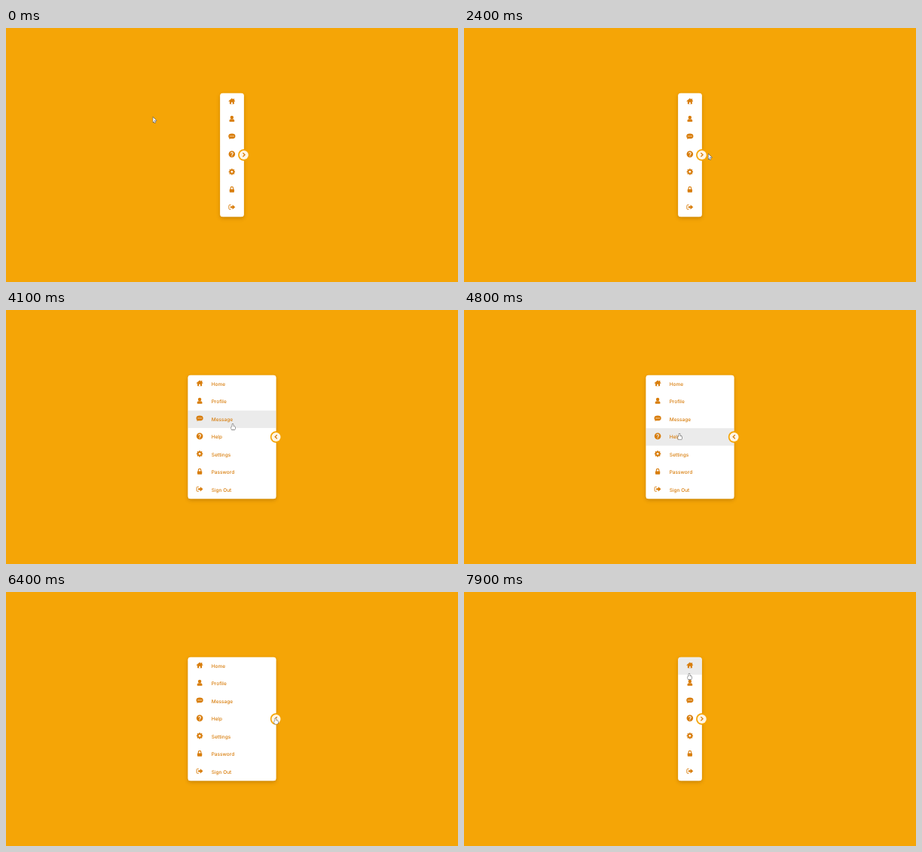
An HTML page with a canvas for the animation above (8000 ms loop, 600 px wide and 338 px high).

```html
<!DOCTYPE html>
<html lang="en">
<head>
<meta charset="utf-8">
<title>Side menu</title>
<style>
  html, body { margin: 0; width: 100%; height: 100%; overflow: hidden; background: #f5a506; }
  canvas { display: block; width: 600px; height: 338px; }
</style>
</head>
<body>
<canvas id="stage"></canvas>
<script>
const W = 600, H = 338, LOOP = 8000, STEP = 100, TAU = Math.PI * 2;
const BG = '#f5a506', INK = '#d87d0c', HOVER = '#ebebeb';
const MID = 300, MID_Y = 169, ROW = 23.5, TALL = ROW * 7, TOP = MID_Y - TALL / 2;
const NARROW = 31.5, WIDE = 117, OPEN_AT = 3044, CLOSE_AT = 6440, SLIDE = 600;
const SPIRAL_END = 2400, TOUR_START = 3500, TOUR_END = 5800;

const canvas = document.getElementById('stage');
const ctx = canvas.getContext('2d');
const dpr = window.devicePixelRatio || 1;
canvas.width = W * dpr;
canvas.height = H * dpr;

const mix = (a, b, u) => a + (b - a) * u;
const smooth = u => u * u * (3 - 2 * u);

// Same curve as the CSS "ease" keyword
function ease(x) {
  if (x <= 0) return 0;
  if (x >= 1) return 1;
  let lo = 0, hi = 1, s = 0.5;
  for (let i = 0; i < 24; i++) {
    s = (lo + hi) / 2;
    if (0.75 * s * (1 - s) + s ** 3 < x) lo = s; else hi = s;
  }
  return 0.3 * s * (1 - s) ** 2 + 3 * s * s * (1 - s) + s ** 3;
}

// Three shrinking turns that drift towards the toggle
function spiral(t) {
  const u = t / SPIRAL_END, a = u * 3 * TAU, r = 49 * (1 - u);
  return [mix(324.6, 195.3, (1 - u) ** 2) - r * Math.sin(a), 168 - r * Math.cos(a)];
}

// Sweeps up and down over the open menu
function tour(t) {
  return [
    301 + 15.5 * Math.cos((t - TOUR_START) / 2400 * TAU),
    168 - 71 * Math.sin((t - TOUR_START - 5) / 1285 * TAU)
  ];
}

// Stops: time, x, y
const stops = [
  [SPIRAL_END, ...spiral(SPIRAL_END)],
  [2700, 315, 167],
  [3050, 315, 167],
  [TOUR_START, ...tour(TOUR_START)],
  [TOUR_END, ...tour(TOUR_END)],
  [6250, 358, 168],
  [6450, 358, 168],
  [7000, 304, 211],
  [7200, 304, 211],
  [7500, 299, 239],
  [7940, 299, 105.5]
];

function glide(t) {
  const i = stops.findIndex(s => s[0] > t);
  if (i < 0) return stops[stops.length - 1].slice(1);
  const [t0, x0, y0] = stops[i - 1], [t1, x1, y1] = stops[i];
  const u = smooth((t - t0) / (t1 - t0));
  return [mix(x0, x1, u), mix(y0, y1, u)];
}

function pointer(t) {
  if (t < SPIRAL_END) return spiral(t);
  return t >= TOUR_START && t < TOUR_END ? tour(t) : glide(t);
}

function fill(color) {
  ctx.fillStyle = color;
  ctx.fill();
}

function line(width, color) {
  ctx.lineWidth = width;
  ctx.strokeStyle = color;
  ctx.stroke();
}

function disc(x, y, r, color) {
  ctx.beginPath();
  ctx.arc(x, y, r, 0, TAU);
  fill(color);
}

function box(x, y, w, h, r, color) {
  ctx.beginPath();
  ctx.roundRect(x, y, w, h, r);
  if (color) fill(color);
}

// Open triangle pointing along the angle
function wedge(x, y, span, depth, angle) {
  ctx.save();
  ctx.translate(x, y);
  ctx.rotate(angle);
  ctx.beginPath();
  ctx.moveTo(-depth / 2, -span / 2);
  ctx.lineTo(depth / 2, 0);
  ctx.lineTo(-depth / 2, span / 2);
  ctx.restore();
}

function home(paper) {
  box(1.9, -3.4, 1.3, 3, 0, INK);
  wedge(0, -1.6, 8.4, 3.6, -TAU / 4);
  fill(INK);
  line(1, INK);
  box(-3, -0.4, 6, 4.2, 0.4, INK);
  box(-0.9, 1.5, 1.8, 2.4, 0, paper);
}

function profile() {
  disc(0, -1.8, 2.2, INK);
  box(-3.5, 0.4, 7, 3.6, [2.4, 2.4, 1, 1], INK);
}

function message(paper) {
  ctx.beginPath();
  ctx.ellipse(0, -0.4, 4.6, 3.4, 0, 0, TAU);
  fill(INK);
  wedge(-2.7, 2.4, 3, 3.4, TAU * 0.36);
  fill(INK);
  for (const x of [-2, 0, 2]) disc(x, -0.4, 0.62, paper);
}

function help(paper) {
  disc(0, 0, 4.3, INK);
  ctx.beginPath();
  ctx.arc(0, -1, 1.35, Math.PI, TAU * 1.15);
  ctx.lineTo(0, 0.9);
  line(1.1, paper);
  disc(0, 2.3, 0.7, paper);
}

function settings(paper) {
  for (let i = 0; i < 4; i++) {
    ctx.rotate(TAU / 8);
    box(-4.2, -0.9, 8.4, 1.8, 0.3, INK);
  }
  disc(0, 0, 3.2, INK);
  disc(0, 0, 1.35, paper);
}

function lock() {
  box(-3.1, -0.4, 6.2, 4.2, 0.7, INK);
  box(-1.8, -3.5, 3.6, 5, 1.8);
  line(1.1, INK);
}

function signOut(paper) {
  box(-4, -3, 4, 6, 1.1);
  line(0.9, INK);
  box(-1.3, -3.6, 2, 7.2, 0, paper);
  box(-2, -1.2, 3.2, 2.4, 0, INK);
  wedge(2.6, 0, 6.4, 3.6, 0);
  fill(INK);
}

const items = [
  ['Home', home], ['Profile', profile], ['Message', message], ['Help', help],
  ['Settings', settings], ['Password', lock], ['Sign Out', signOut]
];

function drawPanel(left, width, active) {
  ctx.save();
  ctx.shadowColor = 'rgba(90, 50, 0, 0.28)';
  ctx.shadowBlur = 5 * dpr;
  ctx.shadowOffsetY = 2 * dpr;
  box(left, TOP, width, TALL, 3.5, '#fff');
  ctx.restore();

  ctx.save();
  box(left, TOP, width, TALL, 3.5);
  ctx.clip();
  ctx.font = '500 6.5px Inter, "Open Sans", sans-serif';
  ctx.textRendering = 'geometricPrecision';
  items.forEach(([label, icon], i) => {
    const y = TOP + ROW * i, paper = i === active ? HOVER : '#fff';
    box(left, y, width, ROW, 0, paper);
    ctx.fillStyle = INK;
    ctx.fillText(label, left + 31.2, y + 13.9);
    ctx.save();
    ctx.translate(left + 15.6, y + 10.6);
    icon(paper);
    ctx.restore();
  });
  ctx.restore();
}

function drawToggle(x, open) {
  disc(x, MID_Y, 7.7, BG);
  disc(x, MID_Y, 6, '#fff6e6');
  wedge(x, MID_Y - 0.3, 5, 2.6, open ? Math.PI : 0);
  line(1.3, INK);
}

function arrowPath() {
  ctx.moveTo(0, 0);
  ctx.lineTo(0, 6);
  ctx.lineTo(4.2, 4.2);
  ctx.closePath();
  ctx.rect(1.6, 4, 1.3, 2.8);
}

function handPath() {
  ctx.roundRect(-0.7, 0, 1.4, 5, 0.7);
  ctx.roundRect(-1.9, 3.1, 5, 4.6, 1.6);
}

function drawPointer(x, y, hand) {
  ctx.save();
  ctx.translate(x, y);
  ctx.beginPath();
  if (hand) handPath(); else arrowPath();
  line(1.2, '#666');
  fill('#fff');
  ctx.restore();
}

function draw(t) {
  const grow = ease((t - OPEN_AT) / SLIDE) - ease((t - CLOSE_AT) / SLIDE);
  const width = mix(NARROW, WIDE, grow), left = MID - width / 2, right = left + width;
  const [x, y] = pointer(t);
  const onToggle = Math.hypot(x - right, y - MID_Y) < 7.5;
  const onPanel = x > left && x < right && y > TOP && y < TOP + TALL;
  const onRow = onPanel && !onToggle && x < right - 2;

  ctx.setTransform(dpr, 0, 0, dpr, 0, 0);
  box(0, 0, W, H, 0, BG);
  drawPanel(left, width, onRow ? Math.floor((y - TOP) / ROW) : -1);
  drawToggle(right, t >= OPEN_AT && t < CLOSE_AT);
  drawPointer(x, y, onPanel || onToggle);
}

const start = performance.now();
function tick() {
  const t = (performance.now() - start) % LOOP;
  draw(Math.floor(t / STEP) * STEP);
  requestAnimationFrame(tick);
}
tick();
</script>
</body>
</html>
```
